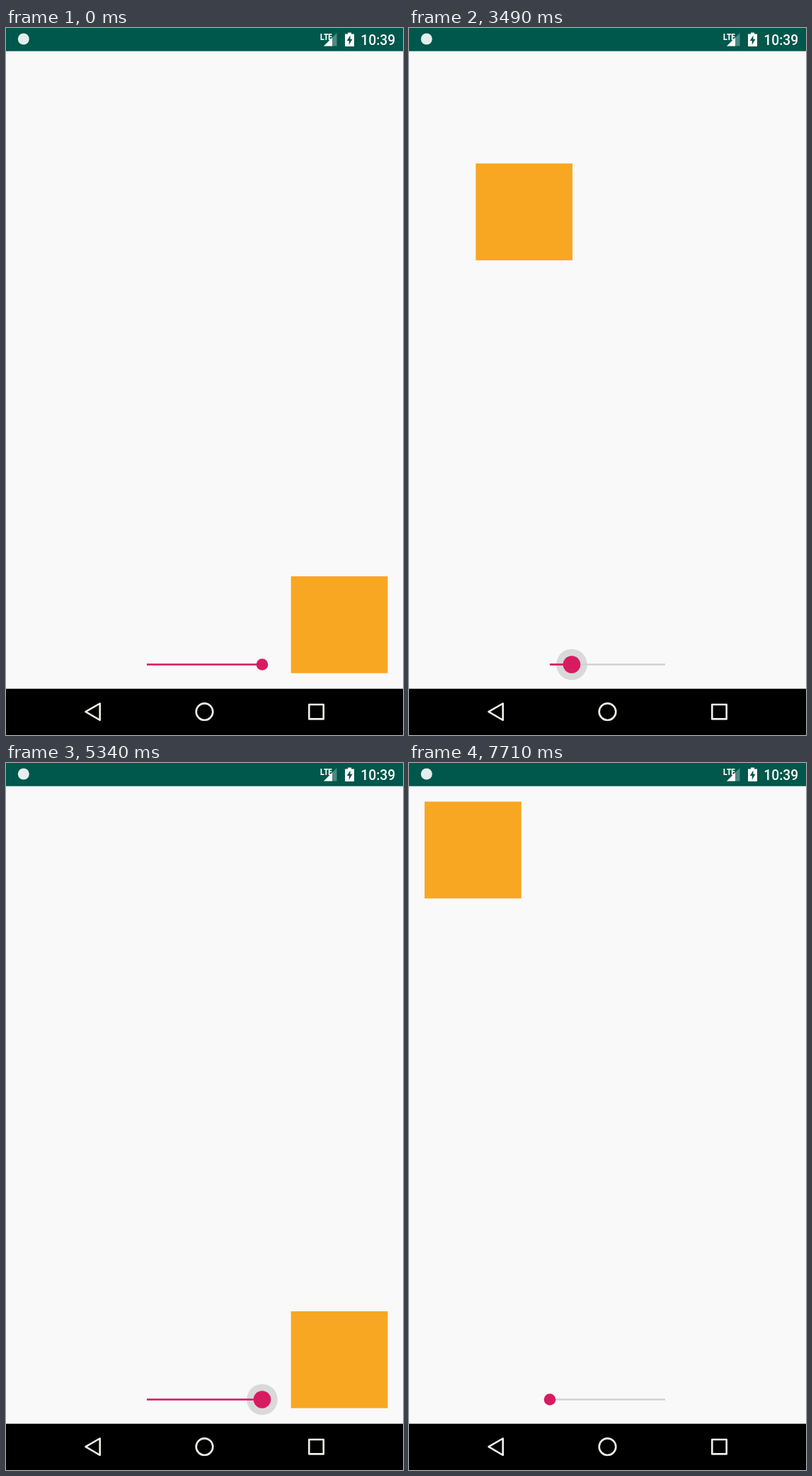
Recreate the animation shown at these times as an HTML page. Size 561x998 px, loop 7.76 s.

```html
<!DOCTYPE html>
<html lang="en">
<head>
<meta charset="utf-8">
<title>Slider moving a box</title>
<style>
  html, body { margin: 0; width: 100%; height: 100%; overflow: hidden; background: #fafafa; }
  svg { display: block; width: 100%; height: 100%; }
  .clock { font: 500 19.3px Roboto, sans-serif; }
  .network { font: 700 11.5px "Open Sans", "Noto Sans", sans-serif; font-stretch: 75%; letter-spacing: -.8px; }
</style>
</head>
<body>
<svg viewBox="0 0 561 998" preserveAspectRatio="none">
  <rect width="561" height="998" fill="#f9f9fa"/>

  <g id="slider">
    <circle id="ripple" cy="898.5" fill="#000"/>
    <path d="M199 898.5H362" stroke="#d0d0d0" stroke-width="2.5"/>
    <path id="filled" stroke="#d81b60" stroke-width="2.7"/>
    <circle id="thumb" cy="898.5" fill="#d81b60"/>
  </g>
  <rect id="box" width="136.7" height="136.7" fill="#f8a722"/>

  <g id="status-bar" fill="#fff">
    <rect width="561" height="32.7" fill="#00574b"/>
    <circle cx="24.8" cy="15.5" r="8" fill="#e5eeec"/>
    <path d="M449 25.5H467.5V7Z" opacity=".3"/>
    <path d="M449 25.5H461V13.5Z"/>
    <text class="network" x="443.5" y="17">LTE</text>
    <path d="M483 6.5h5v2h4v17.5h-13v-17.5h4z"/>
    <path d="M486.5 10.5v5.2h3l-4.8 8v-5.7h-3z" fill="#00574b"/>
    <text class="clock" x="501.3" y="23.8">10:39</text>
  </g>

  <g id="nav-bar" fill="none" stroke="#f1f1ea" stroke-width="2.6" stroke-linejoin="round">
    <rect y="932.7" width="561" height="65.3" fill="#000" stroke="none"/>
    <path d="M112.5 965.2L132.7 953.5V977Z"/>
    <circle cx="280.5" cy="965.2" r="11.8"/>
    <rect x="428.3" y="955" width="20.4" height="20.4"/>
  </g>
</svg>
<script>
const LOOP = 7760, STEP = 43.3, PRESS = 2800, RELEASE = 7270;

// Each drag: start time and [step, slider value] points along it.
const drags = [
  { start: 2840, points: [[0, 1], [15, .19], [17, .117], [22, 0]] },
  { start: 4500, points: [[-1, 0], [6, .359], [17, .928], [19, 1]] },
  { start: 5950, points: [[-1, 1], [8, .509], [17, .178], [23, 0]] },
];

const get = id => document.getElementById(id);
const set = (id, attrs) => {
  for (const name in attrs) get(id).setAttribute(name, attrs[name]);
};
const ramp = (t, from, length) => Math.min(1, Math.max(0, (t - from) / length));
const easeOut = u => 1 - (1 - u) ** 2;

// Smooth curve through the points, at rest at both ends.
function curve(points, x) {
  const last = points.length - 1;
  x = Math.min(x, points[last][0]);
  const secant = i => (points[i + 1][1] - points[i][1]) / (points[i + 1][0] - points[i][0]);
  const slope = i => i === 0 || i === last ? 0 : (secant(i - 1) + secant(i)) / 2;
  let i = 0;
  while (i < last - 1 && x > points[i + 1][0]) i++;
  const [x0, y0] = points[i], [x1, y1] = points[i + 1];
  const w = x1 - x0, s = (x - x0) / w, r = 1 - s;
  return y0 * r * r * (1 + 2 * s) + y1 * s * s * (3 - 2 * s)
    + w * s * r * (slope(i) * r - slope(i + 1) * s);
}

function sliderValue(t) {
  const drag = drags.findLast(d => t >= d.start);
  return drag ? curve(drag.points, Math.floor((t - drag.start + 5) / STEP)) : 1;
}

function draw(t) {
  const value = sliderValue(t);
  const x = 199 + 163 * value;
  const grow = easeOut(ramp(t, PRESS, 220));
  const size = grow * (1 - easeOut(ramp(t, RELEASE, 220)));
  const glow = ramp(t, PRESS, 100) * (1 - ramp(t, RELEASE, 420));

  set("box", { x: 22 + 380.7 * value, y: 54.5 + 719.5 * value });
  set("filled", { d: `M199 898.5H${x}` });
  set("thumb", { cx: x, r: 8.3 + 4 * size });
  set("ripple", { cx: x, r: 21.8 * grow, opacity: .13 * glow });
}

function frame() {
  draw(performance.now() % LOOP);
  requestAnimationFrame(frame);
}
frame();
</script>
</body>
</html>
```
